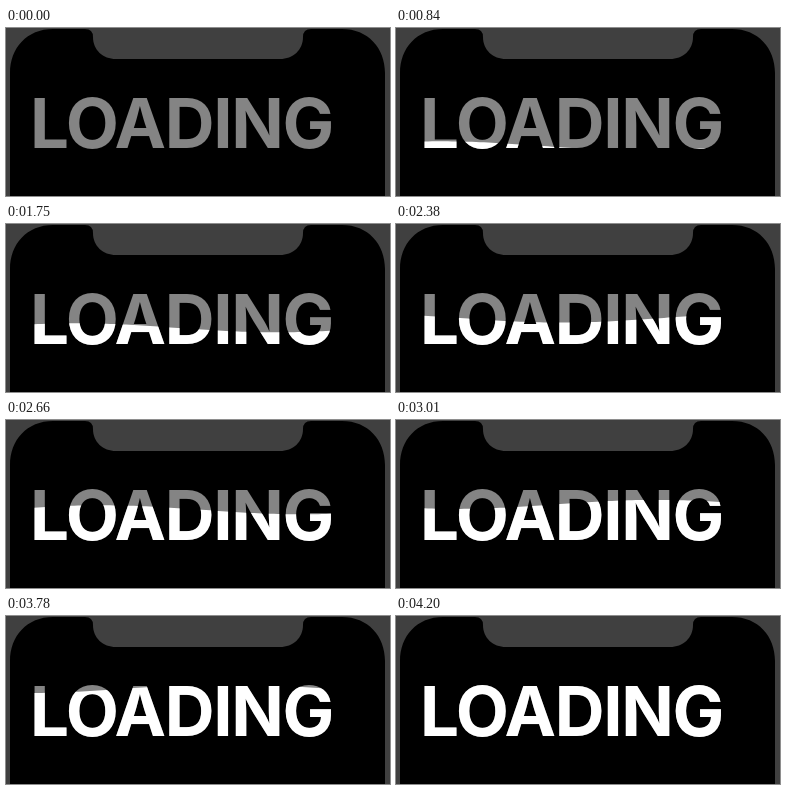
Recreate the animation shown at these times as an HTML page. Size 384 by 168 pixels, loop 4690 ms.

```html
<!DOCTYPE html>
<html lang="en">
<head>
<meta charset="utf-8">
<title>Loading</title>
<style>
  html, body { margin: 0; width: 100%; height: 100%; overflow: hidden; background: #404040; }
  svg { display: block; width: 100%; height: 100%; }
  text { font: 700 69px Inter, "Liberation Sans", sans-serif; }
</style>
</head>
<body>
<svg viewBox="0 0 384 168">
  <defs>
    <text id="word" y="120.2">LOADING</text>
    <clipPath id="fill"><path id="wave"/></clipPath>
  </defs>
  <rect width="384" height="168" fill="#404040"/>
  <path d="M4 168V45C4 20 21 1 47 1H79Q87 1 87 9C87 22 97 31 110 31H274C287 31 297 22 297 9Q297 1 305 1H336C362 1 379 20 379 45V168Z"/>
  <use href="#word" fill="#848484"/>
  <g clip-path="url(#fill)"><use href="#word" fill="#fff"/></g>
</svg>
<script>
const LOOP = 4690, STEP = 70, LAST = 4200;
const LENGTH = 400, SPEED = 0.468, SWING = 4.5, RISE = 0.0154;
const LEFT = 28, RIGHT = 325.5;
const word = document.getElementById('word');
const wave = document.getElementById('wave');

// Track the letters so the ink runs from LEFT to RIGHT.
function setWord() {
  const ctx = document.createElement('canvas').getContext('2d');
  const text = word.textContent;
  ctx.font = '700 69px Inter, "Liberation Sans", sans-serif';
  const m = ctx.measureText(text);
  const ink = m.actualBoundingBoxLeft + m.actualBoundingBoxRight;
  word.style.letterSpacing = (RIGHT - LEFT - ink) / (text.length - 1) + 'px';
  word.setAttribute('x', LEFT + m.actualBoundingBoxLeft);
}

function draw(ms) {
  const t = Math.min(Math.floor(ms / STEP) * STEP, LAST);
  // The surface rises steadily while its trough travels to the right.
  const level = 99.5 - RISE * (t - 2030);
  const trough = 165 + SPEED * (t - 2380);
  let d = 'M0 168';
  for (let x = 0; x <= 384; x += 4) {
    const y = level + SWING * Math.cos(2 * Math.PI * (x - trough) / LENGTH);
    d += `L${x} ${(t === LAST ? 0 : y).toFixed(2)}`;
  }
  wave.setAttribute('d', d + 'V168Z');
}

const start = performance.now();
function tick() {
  draw((performance.now() - start) % LOOP);
  requestAnimationFrame(tick);
}
setWord();
tick();
</script>
</body>
</html>
```
